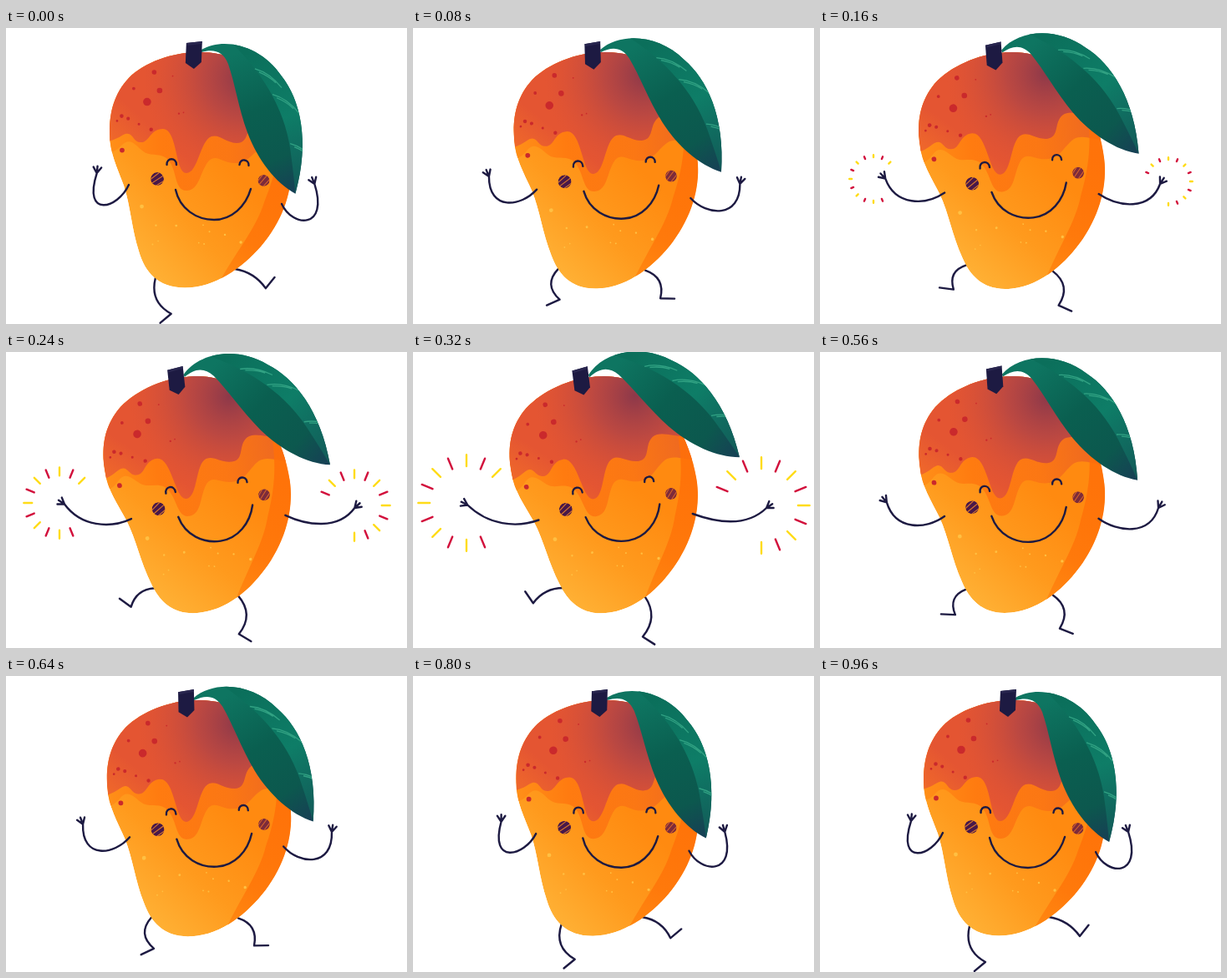
Recreate the animation shown at these times as an HTML page. Size 480 by 355 pixels, loop 1 s.

```html
<!DOCTYPE html>
<html lang="en">
<head>
<meta charset="utf-8">
<title>Dancing mango</title>
<style>
  html, body { margin: 0; width: 100%; height: 100%; overflow: hidden; background: #fff; }
  svg { display: block; width: 100%; height: 100%; }
  .ink { fill: none; stroke: #1d1a42; stroke-width: 2.4; stroke-linecap: round; stroke-linejoin: round; }
</style>
</head>
<body>
<svg viewBox="0 0 480 355">
  <defs>
    <linearGradient id="flesh" gradientUnits="userSpaceOnUse" x1="150" y1="280" x2="270" y2="170">
      <stop offset="0" stop-color="#ffb236"/><stop offset=".5" stop-color="#ff9a1d"/><stop offset="1" stop-color="#ff8a10"/>
    </linearGradient>
    <linearGradient id="shade" gradientUnits="userSpaceOnUse" x1="330" y1="170" x2="245" y2="300">
      <stop offset="0" stop-color="#ff6f08"/><stop offset=".6" stop-color="#ff7509"/><stop offset="1" stop-color="#ff860f"/>
    </linearGradient>
    <linearGradient id="drip" gradientUnits="userSpaceOnUse" x1="125" y1="0" x2="330" y2="0">
      <stop offset="0" stop-color="#ff8f18"/><stop offset=".3" stop-color="#ff7b10"/>
      <stop offset=".7" stop-color="#fb7714"/><stop offset="1" stop-color="#ef6a20"/>
    </linearGradient>
    <linearGradient id="skin" gradientUnits="userSpaceOnUse" x1="128" y1="140" x2="160" y2="105">
      <stop offset="0" stop-color="#f0692a"/><stop offset="1" stop-color="#e45532"/>
    </linearGradient>
    <radialGradient id="dusk" gradientUnits="userSpaceOnUse" cx="285" cy="60" r="120">
      <stop offset="0" stop-color="#83354c" stop-opacity=".9"/><stop offset=".4" stop-color="#a5414a" stop-opacity=".65"/>
      <stop offset="1" stop-color="#d04d3c" stop-opacity="0"/>
    </radialGradient>
    <linearGradient id="leafDark" gradientUnits="userSpaceOnUse" x1="275" y1="30" x2="345" y2="198">
      <stop offset="0" stop-color="#0e7561"/><stop offset=".4" stop-color="#0a5f50"/>
      <stop offset=".75" stop-color="#0c584e"/><stop offset="1" stop-color="#173f55"/>
    </linearGradient>
    <linearGradient id="leafLight" gradientUnits="userSpaceOnUse" x1="290" y1="30" x2="350" y2="195">
      <stop offset="0" stop-color="#0b6f5b"/><stop offset=".5" stop-color="#0e7d67"/><stop offset="1" stop-color="#125a58"/>
    </linearGradient>
    <clipPath id="bodyClip">
      <path id="outline" d="M230 29C200 29 165 41 147 60C130 78 124 100 124 126C124 150 133 167 141 189C149 213 150 240 159 268C166 292 181 311.500 214 311.500C250 311.500 282 288 305 262C330 233 341.500 200 341.500 170C341.500 120 322 75 295 50C275 34 255 29 230 29Z"/>
    </clipPath>
    <clipPath id="leafClip">
      <path id="leafShape" d="M234 26C262 10 306 22 330 58C352 86 364 135 346 199C322 186 301 158 289 126C278 95 274 66 266 43C260 28 249 25 234 29Z"/>
    </clipPath>
    <clipPath id="cheekL"><circle cx="181" cy="181" r="8"/></clipPath>
    <clipPath id="cheekR"><circle cx="308.500" cy="183" r="7"/></clipPath>
  </defs>

  <rect width="480" height="355" fill="#fff"/>
  <path id="rayY" class="ink" style="stroke:#ffdc18"/>
  <path id="rayR" class="ink" style="stroke:#d2103c"/>
  <path id="legs" class="ink"/>

  <g id="body">
    <g clip-path="url(#bodyClip)">
      <use href="#outline" fill="url(#flesh)"/>
      <path fill="url(#drip)" d="M100 0H360V150C335 150 322 136 308 142C294 150 290 163 272 162C258 161 252 151 243 159C232 172 232 195 216 195C200 195 206 168 192 156C182 149 172 155 163 147C155 140 148 130 138 141C130 150 120 152 100 152Z"/>
      <path fill="url(#shade)" opacity=".85" d="M328 100C329 140 326 168 309 209C298 244 274 268 248 318L360 320V100Z"/>
      <path id="cap" d="M100 0H360V118C330 124 312 104 298 112C286 120 292 138 276 138C262 137 256 127 246 130C232 135 230 174 216 174C202 174 206 122 188 121C172 121 172 138 161 137C152 137 152 124 143 127C135 130 130 138 100 138Z" fill="url(#skin)"/>
      <path id="capDusk" fill="url(#dusk)"/>
    </g>
    <g id="spots" fill="#ca292c"></g>
    <g id="flecks" fill="#ffc043"></g>
    <g clip-path="url(#cheekL)">
      <circle cx="181" cy="181" r="8" fill="#481849"/>
      <path d="M171 183L184 173M173 187L190 176M178 190L191 182" stroke="#d9762c" stroke-width="1.100"/>
    </g>
    <g clip-path="url(#cheekR)">
      <circle cx="308.500" cy="183" r="7" fill="#7c2b3a"/>
      <path d="M301 184L309 174M302 189L314 175M307 191L317 180" stroke="#d9642a"/>
    </g>
    <path class="ink" d="M192.500 164C192 155 204 155 204 164M279.500 164C280 156 291 157 290.500 165"/>
    <path class="ink" d="M203 194C208 217 228 230 249 230C270 230 287 214 293 193"/>
    <g id="leaf">
      <use href="#leafShape" fill="url(#leafDark)"/>
      <g clip-path="url(#leafClip)">
        <path fill="url(#leafLight)" d="M262 10C300 45 332 90 340 145C343 168 345 185 346 200L380 200V0Z"/>
        <path id="veins" fill="none" stroke="#31a283" stroke-width="1.300"/>
      </g>
    </g>
    <path fill="#1d1a42" d="M216 18L235 16L234 41L225 49L215 42Z"/>
    <path fill="#29264f" d="M216 18L235 16L234 19L217 21Z"/>
  </g>
  <path id="arms" class="ink"/>
</svg>

<script>
const $ = id => document.getElementById(id);
const LOOP = 1000, TURN = 480, RAD = Math.PI / 180;
const PIVOT = { x: 230, y: 174 };

const clamp = x => Math.min(1, Math.max(0, x));
const mix = (a, b, p) => a + (b - a) * p;
const mixPoint = (a, b, p) => ({ x: mix(a.x, b.x, p), y: mix(a.y, b.y, p) });
const shift = (pt, x, y) => ({ x: pt.x + x, y: pt.y + y });
const polar = (pt, r, deg) => shift(pt, r * Math.cos(deg * RAD), r * Math.sin(deg * RAD));
const at = pt => `${pt.x.toFixed(2)} ${pt.y.toFixed(2)}`;
const line = (a, b) => `M${at(a)}L${at(b)}`;
const easeOut = x => 1 - Math.pow(1 - clamp(x), 2.7);
const easeSine = x => (1 - Math.cos(Math.PI * clamp(x))) / 2;

function turn(pt, deg) {
  const c = Math.cos(deg * RAD), s = Math.sin(deg * RAD);
  const dx = pt.x - PIVOT.x, dy = pt.y - PIVOT.y;
  return shift(PIVOT, dx * c - dy * s, dx * s + dy * c);
}

function seeded(seed) {
  return () => (seed = seed * 16807 % 2147483647) / 2147483647;
}
const random = seeded(77);

const dot = (x, y, r) => `<circle cx="${x}" cy="${y}" r="${r}"/>`;
const scatter = (count, x, y, w, h, r) => Array.from({ length: count }, () =>
  dot(x + w * random(), y + h * random(), r * (0.7 + 0.6 * random()))).join("");

function decorate() {
  $("capDusk").setAttribute("d", $("cap").getAttribute("d"));
  $("spots").innerHTML = dot(169, 88.5, 4.8) + dot(184, 75, 3.3) + dot(177.5, 53, 2.8)
    + dot(139, 146.5, 2.9) + dot(138.5, 105.5, 2.3) + dot(153, 72.5, 1.9)
    + scatter(4, 133, 108, 42, 26, 1.7) + scatter(3, 185, 45, 28, 85, 1.1);
  $("flecks").innerHTML = dot(162.5, 214, 2.4) + dot(281, 257, 1.7)
    + scatter(9, 165, 236, 110, 34, 1.1);
  $("veins").setAttribute("d", [0, 1, 2].map(i => {
    const x = 298 + 21 * i, y = 49 + 45 * i - 14 * (i === 1);
    return `M${x} ${y}q18 5 32 23m-27 -19q12 5 20 13`;
  }).join(""));
}

// Each ankle slides in a straight line; the two legs do the same move in opposite order.
const LEGS = [
  { side: -1, hip: [{ x: 181, y: 283 }, { x: 179, y: 300 }], sway: { x: -6, y: -5 },
    ankle: [{ x: 141, y: 299 }, { x: 198, y: 343 }], toe: [246, 140] },
  { side: 1, hip: [{ x: 274, y: 289 }, { x: 277, y: 293 }], sway: { x: 3, y: 0 },
    ankle: [{ x: 311, y: 312 }, { x: 273, y: 343 }], toe: [-52, 33] }
];

function drawLeg({ side, hip, sway, ankle, toe }, p) {
  const q = side > 0 ? p : 1 - p;
  const arc = Math.sin(Math.PI * q);
  const a = shift(mixPoint(...hip, q), sway.x * arc, sway.y * arc);
  const b = mixPoint(...ankle, q);
  const bulge = 2 * side * (4.5 + 4.5 * q + 2.5 * arc) / Math.hypot(b.x - a.x, b.y - a.y);
  const bend = shift(mixPoint(a, b, 0.5), (b.y - a.y) * bulge, (a.x - b.x) * bulge);
  const tip = polar(b, 17, mix(...toe, 1 - (1 - q) ** 2));
  return `M${at(a)}Q${at(bend)} ${at(b)}L${at(tip)}`;
}

const ARMS = [
  { side: -1, shoulder: { x: 147, y: 188 }, wrist: [{ x: 109, y: 174 }, { x: 63, y: 184 }], hand: [-84, -157] },
  { side: 1, shoulder: { x: 330, y: 211 }, wrist: [{ x: 369, y: 187 }, { x: 426, y: 187 }], hand: [-112, -30] }
];

// Arms hang slack when raised and straighten as they swing out.
function drawArm({ side, shoulder, wrist, hand }, p) {
  const a = turn(shoulder, -10 * p);
  const b = mixPoint(...wrist, p);
  const c1 = shift(a, side * (13 + 15 * p), 29 - 20 * p);
  const c2 = shift(b, side * (17.5 - 44 * p), 54.5 - 32.5 * p);
  const fingers = [-34, 0, 34].map(d => line(b, polar(b, 8.5, mix(...hand, p) + d)));
  return `M${at(a)}C${at(c1)} ${at(c2)} ${at(b)}${fingers.join("")}`;
}

// Twelve of sixteen rays; the gap faces the body.
const BURSTS = [{ x: 64, y: 181, first: 2 }, { x: 417, y: 184, first: -4 }];

function drawRays(t, parity) {
  if (t < 105 || t >= 535) return "";
  const head = mix(25, 64, easeSine((t - 100) / 300));
  const tail = mix(25, 64, easeSine((t - 120) / 410));
  let d = "";
  for (const burst of BURSTS) {
    for (let i = burst.first; i < burst.first + 12; i++) {
      if (Math.abs(i % 2) === parity) d += line(polar(burst, tail, -22.5 * i), polar(burst, head, -22.5 * i));
    }
  }
  return d;
}

function draw(t) {
  const p = t < TURN ? easeOut(t / TURN) : 1 - easeOut((t - TURN) / (LOOP - TURN));
  $("body").setAttribute("transform", `rotate(${-10 * p} ${PIVOT.x} ${PIVOT.y})`);
  $("leaf").setAttribute("transform", `rotate(${-20 * p} 235 25)`);
  $("legs").setAttribute("d", LEGS.map(leg => drawLeg(leg, p)).join(""));
  $("arms").setAttribute("d", ARMS.map(arm => drawArm(arm, p)).join(""));
  $("rayY").setAttribute("d", drawRays(t, 0));
  $("rayR").setAttribute("d", drawRays(t, 1));
}

decorate();
const start = performance.now();
function tick() {
  draw((performance.now() - start) % LOOP);
  requestAnimationFrame(tick);
}
tick();
</script>
</body>
</html>
```
